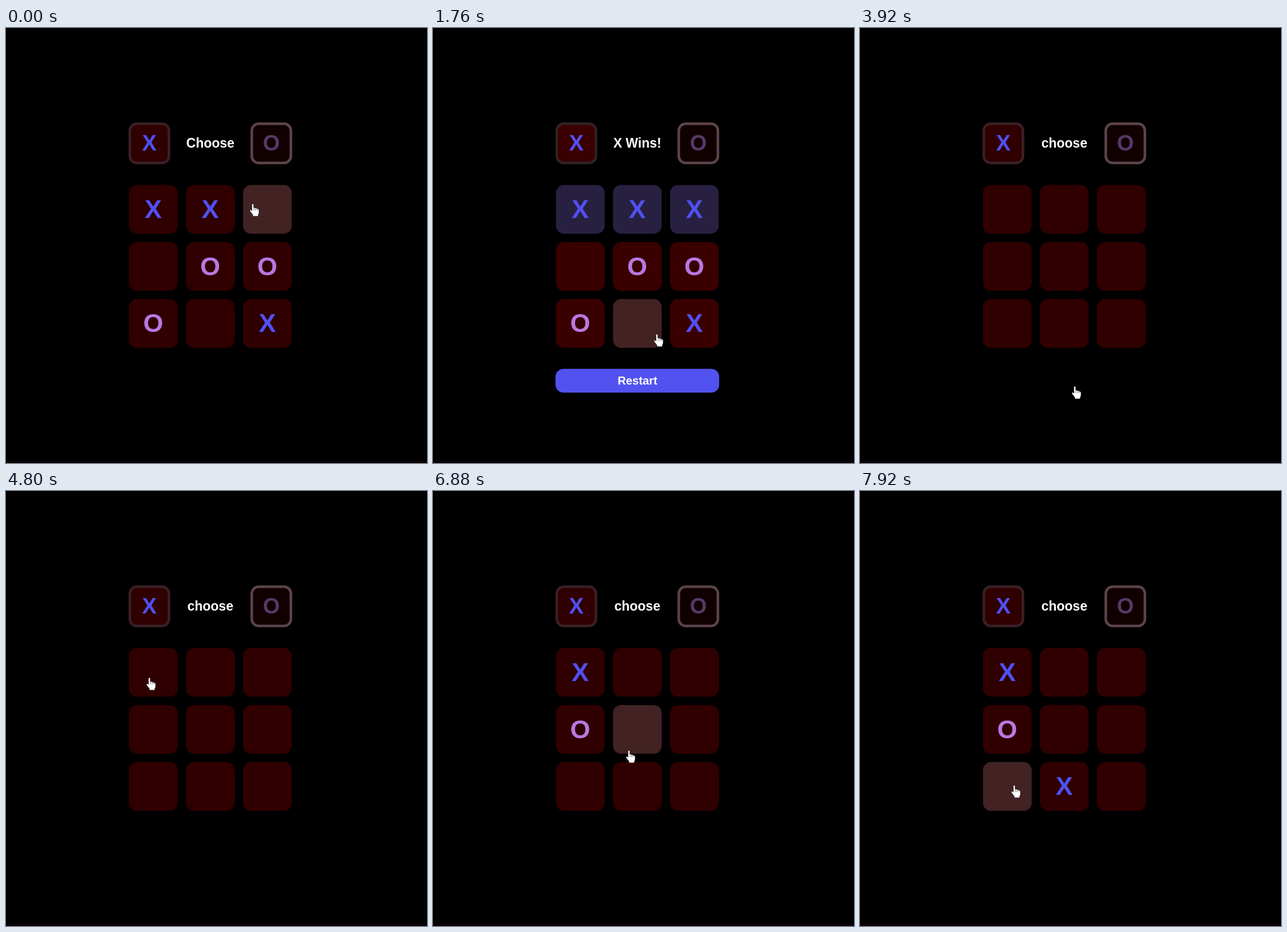
Recreate the animation shown at these times as an HTML page. Size 737 px wide and 760 px high, loop 8000 ms.

```html
<!DOCTYPE html>
<html lang="en">
<head>
<meta charset="utf-8">
<title>Tic-tac-toe</title>
<style>
  html, body { margin: 0; width: 100%; height: 100%; overflow: hidden; background: #000; }
  svg { display: block; width: 737px; height: 760px; }
  text { font: bold 23px "Liberation Sans", Arial, sans-serif; text-anchor: middle; fill: #fff; }
  .mark { font-size: 45px; }
  .badge { font-size: 38px; }
  .restart { font-size: 20.2px; }
</style>
</head>
<body>
<svg id="stage" viewBox="0 0 737 760"></svg>
<script>
const LOOP = 8000, STEP = 80, HOVER_LAG = 80;
const WIN_AT = 560, RESET_AT = 3840;
const BLUE = '#5050f2', PURPLE = '#b878e0';
const button = { x: 214.5, y: 595.5, w: 286.5, h: 41.5 };

// [time, x, y] of the fingertip
const cursorPath = [
  [0, 432, 307], [1360, 432, 307], [1920, 376, 626], [4160, 376, 626],
  [4800, 251, 326], [5440, 251, 326], [5840, 357, 330], [5920, 357, 330],
  [6320, 258, 415], [6480, 258, 415], [6800, 343, 453], [6880, 343, 453],
  [7200, 352, 505], [7440, 352, 505], [7840, 270, 514], [LOOP, 270, 514]
];
// [time, cell, mark] of the second game
const moves = [[5200, 0, 'X'], [6400, 3, 'O'], [7280, 7, 'X']];

const stage = document.getElementById('stage');

function add(tag, attrs, parent = stage) {
  const node = document.createElementNS('http://www.w3.org/2000/svg', tag);
  for (const key in attrs) node.setAttribute(key, attrs[key]);
  return parent.appendChild(node);
}
function box({ x, y, w, h }, attrs) {
  return add('rect', { x, y, width: w, height: h, rx: 14, ...attrs });
}
function label(x, y, text, attrs) {
  const node = add('text', { x, y, ...attrs });
  node.textContent = text;
  return node;
}
function inside(p, { x, y, w, h }) {
  return p.x >= x && p.x < x + w && p.y >= y && p.y < y + h;
}

function badge(x, mark, fill, border, color) {
  const frame = box({ x: x + 2.25, y: 167.25, w: 68.5, h: 68.5 },
    { rx: 12, fill, stroke: border, 'stroke-width': 4.5 });
  label(x + 36.5, 214, mark, { class: 'badge', style: `fill:${color}` });
  return frame;
}

add('rect', { x: 0, y: 756.5, width: 737, height: 3.5, fill: '#0c0004' });
const leftBadge = badge(214.5, 'X', '#300000', '#3a2026', BLUE);
badge(428, 'O', '#100000', '#5c4448', '#583868');
const status = label(357.7, 209, '');

const cells = Array.from({ length: 9 }, (_, i) => {
  const area = { x: 215.3 + i % 3 * 99.85, y: 274.2 + Math.floor(i / 3) * 99.7, w: 85.2, h: 85.2 };
  return {
    area,
    rect: box(area),
    text: label(area.x + 42.4, area.y + 57.8, '', { class: 'mark' })
  };
});

const restartRect = box(button);
const restartText = label(358, 623, 'Restart', { class: 'restart' });

const hand = add('g', {});
add('path', {
  d: 'M-1.7 12V1.6Q-1.6 0 0 0T1.7 1.6V7Q4.6 6 5 8Q8 7.2 8.2 9Q11 8.6 11 11V15Q11 18 9.5 19.2V22H0V19.5L-5 13Q-5.6 10.5-3.6 10.5Z',
  fill: '#fff', stroke: '#181018', 'stroke-width': .8
}, hand);
add('path', { d: 'M2 7.5V12M5 8.5V12M8 9.5V12', stroke: '#554a50', 'stroke-width': .8 }, hand);

function cursorAt(t) {
  const next = Math.max(1, cursorPath.findIndex(p => p[0] >= t));
  const [t0, x0, y0] = cursorPath[next - 1], [t1, x1, y1] = cursorPath[next];
  const k = (t - t0) / (t1 - t0);
  return { x: x0 + (x1 - x0) * k, y: y0 + (y1 - y0) * k };
}

function boardAt(t) {
  if (t < RESET_AT) return [...(t < WIN_AT ? 'XX  OOO X' : 'XXX OOO X')];
  const board = Array(9).fill(' ');
  for (const [time, cell, mark] of moves) if (t >= time) board[cell] = mark;
  return board;
}

function render(t) {
  const won = t >= WIN_AT && t < RESET_AT;
  const board = boardAt(t);
  const tip = cursorAt(t);
  const hoverTip = cursorAt(Math.max(0, t - HOVER_LAG));
  const plain = won ? '#3a0000' : '#300000';

  status.textContent = won ? 'X Wins!' : t < WIN_AT ? 'Choose' : 'choose';
  leftBadge.setAttribute('fill', plain);
  leftBadge.setAttribute('stroke', won ? '#322222' : '#3a2026');

  cells.forEach(({ area, rect, text }, i) => {
    const hovered = board[i] === ' ' && inside(hoverTip, area);
    rect.setAttribute('fill', won && i < 3 ? '#282040' : hovered ? '#422222' : plain);
    text.textContent = board[i].trim();
    text.style.fill = board[i] === 'X' ? BLUE : PURPLE;
  });

  restartRect.setAttribute('fill', inside(hoverTip, button) ? '#3a3af0' : '#5252f0');
  for (const node of [restartRect, restartText]) node.style.display = won ? '' : 'none';
  hand.setAttribute('transform', `translate(${tip.x} ${tip.y})`);
}

function tick() {
  const t = performance.now() % LOOP;
  render(Math.floor(t / STEP) * STEP);
  requestAnimationFrame(tick);
}
tick();
</script>
</body>
</html>
```
